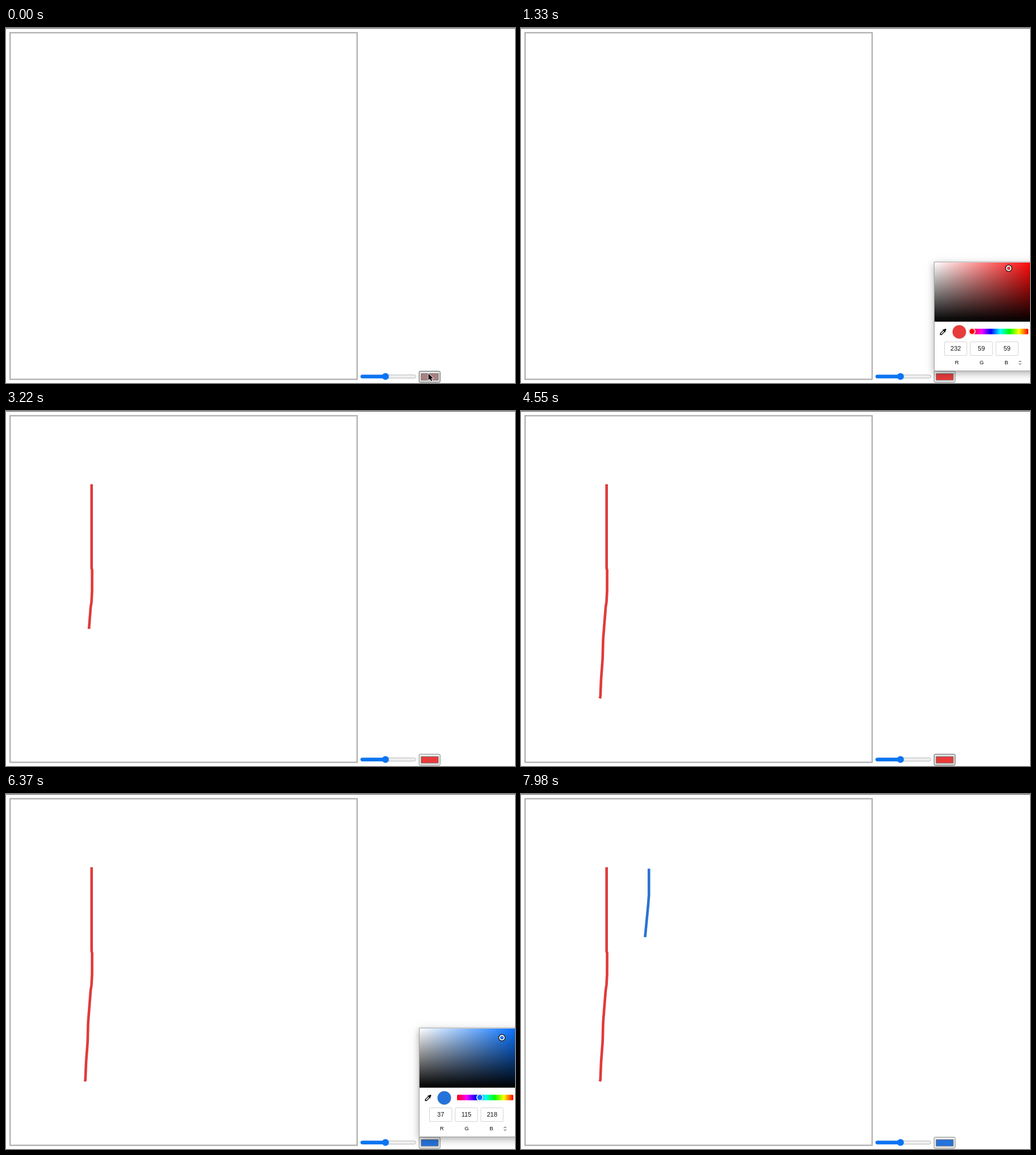
Write an HTML page with a canvas that moves like this. It is 896 px wide and 625 px high and loops after 8000 ms.

```html
<!DOCTYPE html>
<html lang="en">
<head>
<meta charset="utf-8">
<title>Drawing pad</title>
<style>
html, body { margin: 0; width: 100%; height: 100%; overflow: hidden; background: #fff; }
canvas { display: block; }
</style>
</head>
<body>
<canvas id="stage" width="896" height="625"></canvas>
<script>
const ctx = document.getElementById('stage').getContext('2d');
const LOOP = 8000, STEP = 70;
const RED = [232, 59, 59], BLUE = [37, 115, 218];

// Picked colour by start time: rgb, hue, marker position in the shade field
const picks = [
  { at: 0, rgb: [170, 128, 128], hue: 0, mark: [771, 448] },
  { at: 1330, rgb: RED, hue: 0, mark: [858.5, 423] },
  { at: 4690, rgb: RED, hue: 0, mark: [856.3, 423] },
  { at: 5600, rgb: [59, 134, 232], hue: 214, mark: [856.3, 423] },
  { at: 6370, rgb: BLUE, hue: 214, mark: [873, 429] }
];
const popupTimes = [[280, 2590], [4690, 7630]];
const hoverTimes = [[0, 700], [4550, 5040]];

const redLine = [[150.7, 129], [150.7, 277], [151.6, 280], [151.5, 318], [150.5, 336],
  [149, 346], [144.6, 402], [143.7, 436], [141, 472], [139.7, 503], [138.8, 506]];
const blueLine = [[225.2, 131.5], [225.2, 178], [223.8, 196], [218.4, 252]];

const eyedropper = new Path2D('M20.7 5.6l-2.3-2.3c-.4-.4-1-.4-1.4 0l-3.1 3.1-2-1.9-1.4 1.4 1.4 1.4L3 16.2V21h4.8l8.9-8.9 1.4 1.4 1.4-1.4-1.9-1.9 3.1-3.1c.4-.4.4-1 0-1.5zM6.9 19L5 17.1l8.1-8.1 1.9 1.9z');
const arrow = new Path2D('M0 0V11.2L2.6 8.9 4.5 13 6.5 12.1 4.7 8.1H8.2Z');

const css = rgb => `rgb(${rgb})`;
const within = (t, spans) => spans.some(([a, b]) => t >= a && t < b);

function box(x, y, w, h, r, fill, stroke) {
  ctx.beginPath();
  ctx.roundRect(x, y, w, h, r);
  ctx.fillStyle = fill;
  ctx.fill();
  if (stroke) {
    ctx.lineWidth = 1;
    ctx.strokeStyle = stroke;
    ctx.stroke();
  }
}

function disc(x, y, r, fill) {
  ctx.beginPath();
  ctx.arc(x, y, r, 0, 2 * Math.PI);
  ctx.fillStyle = fill;
  ctx.fill();
}

function fade(x0, y0, x1, y1, colors) {
  const g = ctx.createLinearGradient(x0, y0, x1, y1);
  colors.forEach((c, i) => g.addColorStop(i / (colors.length - 1), c));
  return g;
}

// Strokes the given share of a polyline's length
function trail(points, share, color) {
  if (share <= 0) return;
  const dist = (a, b) => Math.hypot(b[0] - a[0], b[1] - a[1]);
  let left = share * points.slice(1).reduce((sum, p, i) => sum + dist(points[i], p), 0);
  ctx.beginPath();
  ctx.moveTo(...points[0]);
  for (let i = 1; i < points.length && left > 0; i++) {
    const [a, b] = [points[i - 1], points[i]];
    const k = Math.min(1, left / dist(a, b));
    ctx.lineTo(a[0] + (b[0] - a[0]) * k, a[1] + (b[1] - a[1]) * k);
    left -= dist(a, b);
  }
  ctx.lineWidth = 4.6;
  ctx.strokeStyle = color;
  ctx.stroke();
}

function slider() {
  box(624.5, 610.8, 97, 5.6, 2.8, '#efefef', '#b8b8b8');
  box(624, 610.5, 44, 6.2, 3.1, '#0a75f5');
  disc(668, 613.6, 6, '#0a75f5');
}

function swatch(color, hover) {
  box(727.2, 604.2, 37, 19.5, 2, hover ? '#e4e4e4' : '#efefef', hover ? '#555' : '#808080');
  box(730.8, 608.4, 30.2, 11.6, 0, color, '#777');
}

function label(text, x, y, size) {
  ctx.font = `${size}px "Liberation Sans", Arial, sans-serif`;
  ctx.fillStyle = '#111';
  ctx.fillText(text, x, y);
}

function popup({ rgb, hue, mark }) {
  ctx.save();
  ctx.shadowColor = 'rgba(0,0,0,.32)';
  ctx.shadowBlur = 13;
  ctx.shadowOffsetY = 4;
  box(727, 412, 190, 192, 0, '#fff');
  ctx.restore();
  box(727.4, 412, 190, 191.7, 0, '#fff', '#999');

  const pure = `hsl(${hue},100%,50%)`;
  for (const fill of [fade(728, 0, 903, 0, ['#fff', pure]),
    fade(0, 413, 0, 517, ['rgba(0,0,0,0)', '#000'])]) {
    box(728, 413, 175, 104, 0, fill);
  }
  disc(...mark, 6.2, '#111');
  disc(...mark, 4.9, '#fff');
  disc(...mark, 3.1, css(rgb));

  ctx.save();
  ctx.translate(735.7, 527.4);
  ctx.scale(.62, .62);
  ctx.fillStyle = '#000';
  ctx.fill(eyedropper, 'evenodd');
  ctx.restore();

  disc(771.5, 535, 12.3, 'rgba(0,0,0,.22)');
  disc(771.5, 535, 11.8, css(rgb));
  box(794, 529.6, 99, 9.6, 1.5,
    fade(794, 0, 893, 0, ['#f00', '#f0f', '#00f', '#0ff', '#0f0', '#ff0', '#f00']));
  const hx = 794 + (hue ? (360 - hue) / 360 : 0) * 99;
  disc(hx, 534.2, 6.6, 'rgba(0,0,0,.22)');
  disc(hx, 534.2, 6.1, '#fff');
  disc(hx, 534.2, 4.6, pure);

  ctx.textAlign = 'center';
  rgb.forEach((value, i) => {
    const x = 745.5 + i * 45.2;
    box(x, 552.5, 39.3, 24, 1.5, '#fff', '#d4d4d4');
    label(value, x + 19.7, 568.3, 11);
    label('RGB'[i], 767.3 + i * 43.6, 592.4, 9.6);
  });
  ctx.beginPath();
  for (const [y, tip] of [[588, -2], [590.5, 2]]) {
    ctx.moveTo(876.5, y);
    ctx.lineTo(878.5, y + tip);
    ctx.lineTo(880.5, y);
  }
  ctx.lineWidth = 1;
  ctx.strokeStyle = '#222';
  ctx.stroke();
}

function cursor(x, y) {
  ctx.save();
  ctx.translate(x, y);
  ctx.lineWidth = 1.6;
  ctx.strokeStyle = '#fff';
  ctx.stroke(arrow);
  ctx.fillStyle = '#000';
  ctx.fill(arrow);
  ctx.restore();
}

function redShare(t) {
  if (t < 2800) return 0;
  const k = Math.min(1, (Math.floor((t - 2800) / STEP) + .5) / 10.5);
  return k * k * (3 - 2 * k);
}

function blueShare(t) {
  if (t < 7630) return 0;
  return t < 7840 ? .03 : [.22, .58, 1][Math.min(2, Math.floor((t - 7840) / STEP))];
}

function draw(t) {
  const pick = picks.findLast(p => p.at <= t);
  box(0, 0, 896, 625, 0, '#fff');
  box(0, 0, 896, 1, 0, '#555');
  ctx.lineWidth = 2.3;
  ctx.strokeStyle = '#b0b0b0';
  ctx.strokeRect(7.2, 8.3, 610.9, 610.2);

  trail(redLine, redShare(t), '#e03b3a');
  trail(blueLine, blueShare(t), '#2a73d2');
  slider();
  swatch(css(pick.rgb), within(t, hoverTimes));
  if (within(t, popupTimes)) popup(pick);
  if (t < 70) cursor(743.6, 608.6);
}

const start = performance.now();
function frame() {
  draw((performance.now() - start) % LOOP);
  requestAnimationFrame(frame);
}
frame();
</script>
</body>
</html>
```
